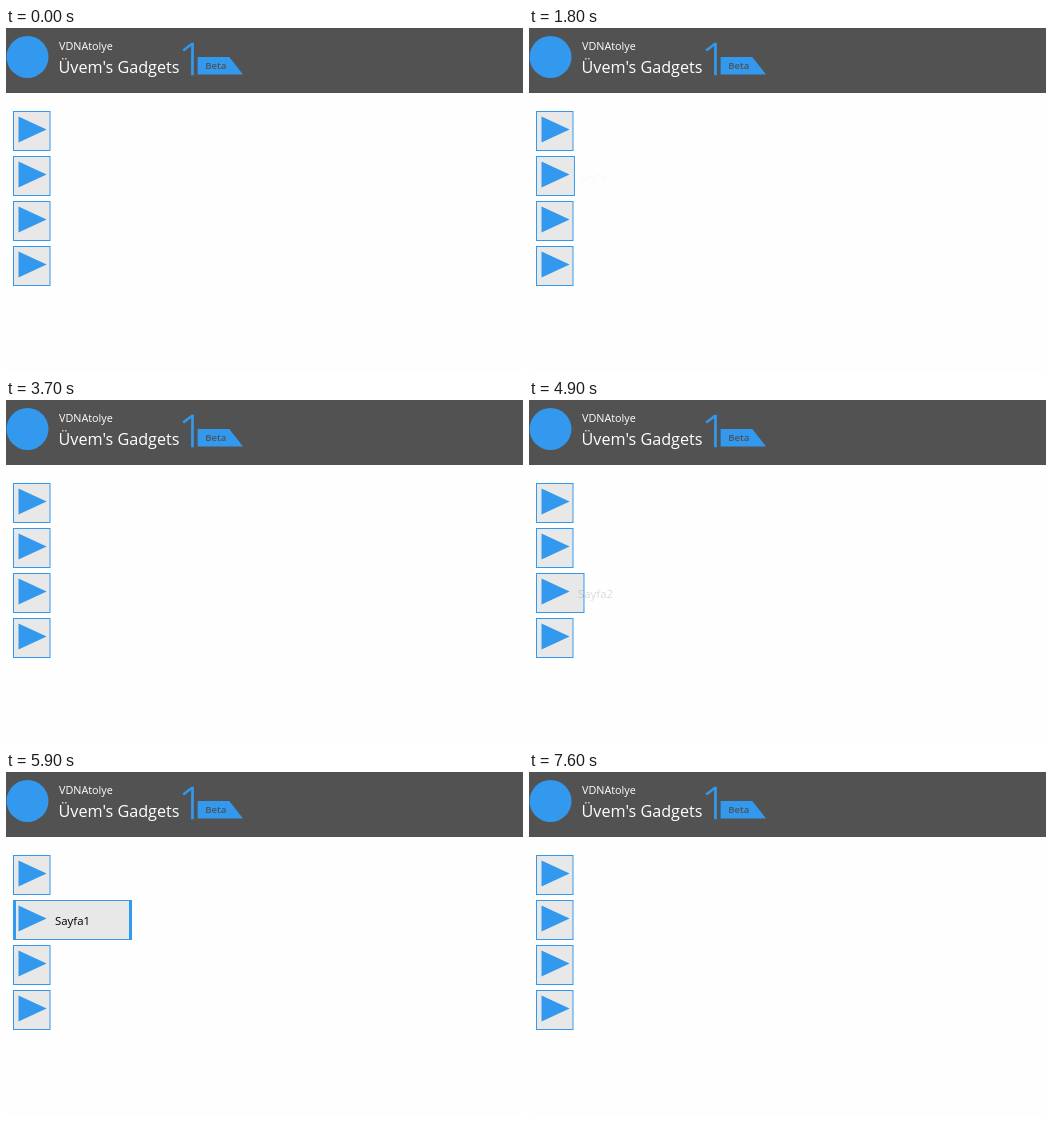
These frames come from a looping animation (517x344 px, 8800 ms). An HTML page with a canvas:

```html
<!DOCTYPE html>
<html lang="tr">
<head>
<meta charset="utf-8">
<title>Menu</title>
<style>
  html, body { margin: 0; width: 100%; height: 100%; overflow: hidden; background: #fefefe; }
  canvas { display: block; }
</style>
</head>
<body>
<canvas id="stage" width="517" height="344"></canvas>
<script>
const ctx = document.getElementById('stage').getContext('2d');
const LOOP = 8800, TICK = 100, GROW = 300;
const BLUE = '#3399ee', GREY = '#525252', FACE = '#e8e8e8', PAGE = '#fefefe';
const FONT = '"Open Sans", "Noto Sans", sans-serif';
const LABELS = ['Ana Sayfa', 'Sayfa1', 'Sayfa2', 'Sayfa3'];

// Hovered row over time; lead is the time already grown at the first tick.
const HOVERS = [
  { from: 700, to: 1800, row: 0, lead: 7 },
  { from: 1800, to: 2800, row: 1, lead: 7 },
  { from: 2800, to: 3700, row: 2, lead: 0 },
  { from: 3800, to: 4900, row: 3, lead: 7 },
  { from: 4900, to: 5600, row: 2, lead: 42 },
  { from: 5600, to: 6400, row: 1, lead: 7 },
  { from: 6400, to: 7600, row: 0, lead: 7 }
];

function rect(x, y, w, h, color) {
  ctx.fillStyle = color;
  ctx.fillRect(x, y, w, h);
}

function poly(color, ...points) {
  ctx.fillStyle = color;
  ctx.beginPath();
  for (const [x, y] of points) ctx.lineTo(x, y);
  ctx.fill();
}

function text(str, x, y, size, color, weight = 400) {
  ctx.font = `${weight} ${size}px ${FONT}`;
  ctx.fillStyle = color;
  ctx.fillText(str, x, y);
}

function header() {
  rect(0, 0, 517, 65, GREY);
  ctx.fillStyle = BLUE;
  ctx.beginPath();
  ctx.arc(21.5, 29, 21, 0, Math.PI * 2);
  ctx.fill();
  text('VDNAtolye', 53, 22, 10.8, '#fff');
  text("Üvem's Gadgets", 52.5, 45, 16.2, '#fff');
  text('1', 172.5, 46.5, 45, BLUE, 300);
  ctx.strokeStyle = BLUE;
  ctx.lineWidth = 0.7;
  ctx.strokeText('1', 172.5, 46.5);
  poly(BLUE, [191.6, 29], [223.3, 29], [237, 46.5], [191.6, 46.5]);
  text('Beta', 199.2, 41, 9.6, GREY, 600);
}

function button(row, grow) {
  const y = 83 + row * 45;
  const open = grow !== null;
  const w = open ? 37 + 82 * grow : 37.5;
  const side = open ? Math.round(1 + 2 * grow) : 1;
  rect(7, y, w, 40, BLUE);
  rect(7 + side, y + 1, w - 2 * side, 38, FACE);
  poly(BLUE, [12.5, y + 5.6], [40.6, y + 18.5], [12.5, y + 31.6]);
  if (open) text(LABELS[row], 49, y + 25, 11.4, `rgba(0,0,0,${grow})`);
}

function draw(now) {
  const t = Math.floor((now % LOOP) / TICK) * TICK;
  const hover = HOVERS.find(h => t >= h.from && t < h.to);
  rect(0, 0, 517, 344, PAGE);
  header();
  LABELS.forEach((_, row) => {
    const active = hover && hover.row === row;
    button(row, active ? Math.min(1, (t - hover.from + hover.lead) / GROW) : null);
  });
}

let start = null;
function frame(now) {
  if (start === null) start = now;
  draw(now - start);
  requestAnimationFrame(frame);
}
draw(0);
requestAnimationFrame(frame);
</script>
</body>
</html>
```
